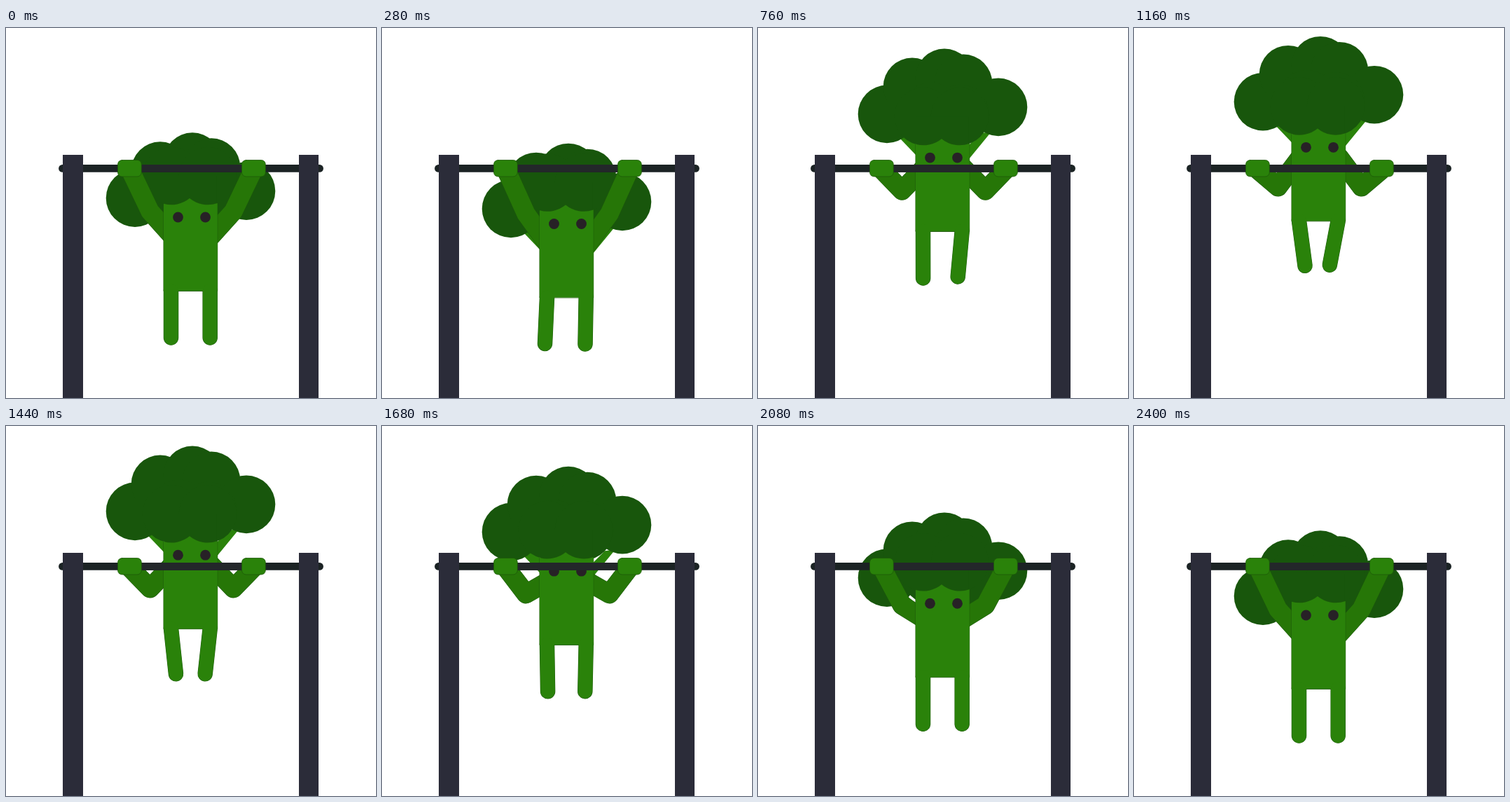
Animation, 528 px wide and 528 px high, one loop 2.56 s. Source, as an HTML page with a canvas:

```html
<!DOCTYPE html>
<html lang="en">
<head>
<meta charset="utf-8">
<title>Broccoli pull-ups</title>
<style>
  html, body { margin: 0; width: 100%; height: 100%; overflow: hidden; background: #fff; }
  canvas { display: block; width: 528px; height: 528px; }
</style>
</head>
<body>
<canvas id="stage" width="528" height="528"></canvas>
<script>
const ctx = document.getElementById('stage').getContext('2d');
const LOOP = 2560, STEP = 40, LAST = 2400;
const DIP = 280, PEAK = 1000;
const REST_EYE = 270, LOW_EYE = 279.5, HIGH_EYE = 168;
const SKIN = '#2a820a', ARM = '#267607', HAIR = '#18560c', EDGE = '#1c590a';
const DARK = '#272126', POST = '#2b2c39';
const LOBE = 41.3, LEG = 20.5, LEFT = 225, RIGHT = 301.7;
const LOBES = [[184, 93], [220, 54], [266, 41], [293, 49], [343, 83], [288, 92], [247, 89]];

const mix = (a, b, u) => a + (b - a) * u;

// Ease in and out; a bias above 1 delays the fast part.
function ease(u, power, bias = 1) {
  const a = u ** power, b = bias * (1 - u) ** power;
  return a / (a + b);
}

// One smooth swell from 0 to 1 and back between two times.
function swell(t, from, to) {
  return t > from && t < to ? Math.sin(Math.PI * (t - from) / (to - from)) ** 2 : 0;
}

function eyeLevel(t) {
  if (t < DIP) return mix(REST_EYE, LOW_EYE, ease(t / DIP, 2));
  if (t < PEAK) return mix(LOW_EYE, HIGH_EYE, ease((t - DIP) / (PEAK - DIP), 2.47));
  return mix(HIGH_EYE, REST_EYE, ease((t - PEAK) / (LAST - PEAK), 1.65, 1.46));
}

// The crown sinks behind the head as the body hangs lower.
function hairTop(eye) {
  const drop = eye - HIGH_EYE;
  return eye - 158.5 + 0.16 * drop + 0.0021 * drop * drop;
}

function circle(x, y, r, color) {
  ctx.fillStyle = color;
  ctx.beginPath();
  ctx.arc(x, y, r, 0, Math.PI * 2);
  ctx.fill();
}

function polygon(points, color) {
  ctx.fillStyle = color;
  ctx.beginPath();
  points.forEach(([x, y]) => ctx.lineTo(x, y));
  ctx.fill();
}

function limb(points, width, color) {
  ctx.strokeStyle = color;
  ctx.lineWidth = width;
  ctx.lineCap = ctx.lineJoin = 'round';
  ctx.beginPath();
  points.forEach(([x, y]) => ctx.lineTo(x, y));
  ctx.stroke();
}

function drawHair(eye) {
  ctx.save();
  ctx.translate(0, hairTop(eye));
  polygon([[203, 128], [225, 151], [225, 129], [213, 119]], SKIN);
  polygon([[333, 118], [301, 157], [301, 137], [318, 120]], SKIN);
  polygon(LOBES, HAIR);
  LOBES.forEach(([x, y]) => circle(x, y, LOBE, HAIR));
  ctx.restore();
  for (const x of [236, 288]) circle(x, eye - 59, LOBE, HAIR);
  ctx.fillRect(LEFT + 1, eye - 59, RIGHT - LEFT - 2, 45);
}

function drawArms(eye) {
  const elbow = 227 + (eye - 171) * 0.35;
  const shoulder = eye + 14.5 + Math.max(0, eye - 225) * 0.27;
  for (const mirror of [x => x, x => 530 - x]) {
    const joints = [[mirror(177.5), 203], [mirror(205.5), elbow], [mirror(237), shoulder]];
    limb(joints, 27.5, EDGE);
    limb(joints, 26.5, ARM);
  }
}

function drawBody(eye, t) {
  const hip = eye + 105;
  const dip = swell(t, 0, 2 * DIP);
  const leftSwing = 9.3 * swell(t, 720, 1800) - 3 * dip;
  const rightSwing = -12 * swell(t, 400, 1840) - 1.2 * dip;
  const legs = [[235.5, leftSwing], [291.2, rightSwing]].map(([x, swing]) =>
    [[x, hip], [x + swing, eye + 172 - Math.abs(swing) * 0.35]]);

  // The top edge follows the underside of two hair lobes.
  const angle = (x, center) => Math.acos((x - center) / LOBE);
  const y = eye - 59;
  legs.forEach(leg => limb(leg, LEG + 1, EDGE));
  ctx.fillStyle = SKIN;
  ctx.strokeStyle = EDGE;
  ctx.lineWidth = 1;
  ctx.beginPath();
  ctx.moveTo(LEFT, hip);
  ctx.arc(236, y, LOBE, angle(LEFT, 236), angle(262, 236), true);
  ctx.arc(288, y, LOBE, angle(262, 288), angle(RIGHT, 288), true);
  ctx.lineTo(RIGHT, hip);
  ctx.closePath();
  ctx.stroke();
  ctx.fill();
  legs.forEach(leg => limb(leg, LEG, SKIN));

  for (const x of [245.5, 284.5]) circle(x, eye, 7.4, DARK);
}

function drawFrame() {
  limb([[80.5, 200.4], [447.5, 200.4]], 10.8, '#1b2324');
  ctx.fillStyle = '#23272a';
  ctx.fillRect(190, 195, 150, 10.8);
  ctx.fillStyle = POST;
  ctx.fillRect(81, 181, 29, 347);
  ctx.fillRect(418, 181, 28, 347);
  for (const x of [159.5, 336.5]) {
    ctx.beginPath();
    ctx.roundRect(x, 188.5, 33.8, 23.5, 6);
    ctx.fillStyle = SKIN;
    ctx.fill();
    ctx.strokeStyle = EDGE;
    ctx.lineWidth = 0.8;
    ctx.stroke();
  }
}

function draw(t) {
  const eye = eyeLevel(t);
  ctx.fillStyle = '#fff';
  ctx.fillRect(0, 0, 528, 528);
  drawHair(eye);
  drawArms(eye);
  drawBody(eye, t);
  drawFrame();
}

const start = performance.now();
function tick() {
  const t = (performance.now() - start) % LOOP;
  draw(Math.min(LAST, Math.floor(t / STEP) * STEP));
  requestAnimationFrame(tick);
}
tick();
</script>
</body>
</html>
```
